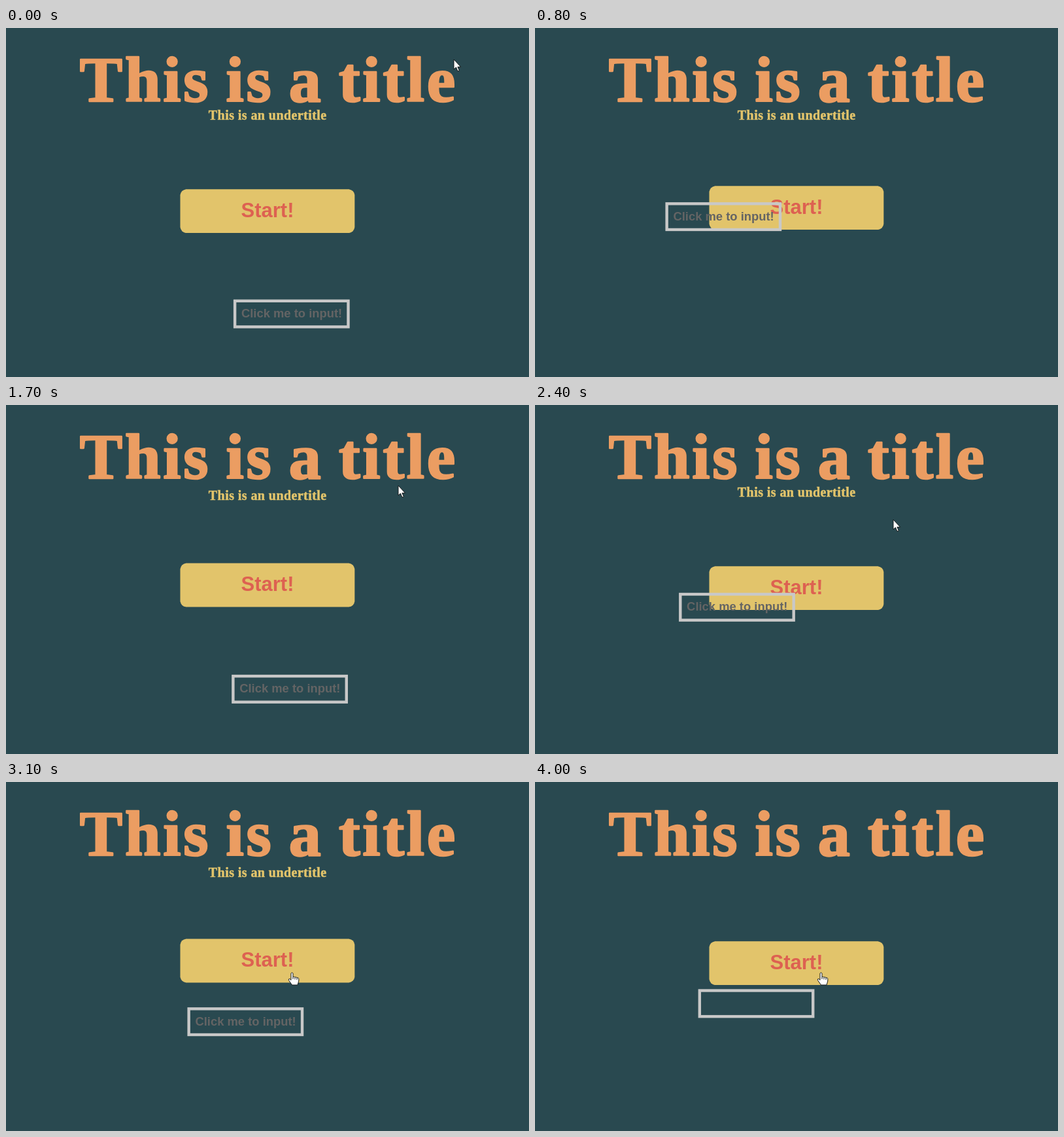
Write an HTML page that moves like this. It is 800 by 533 pixels and loops after 4.1 s.

```html
<!DOCTYPE html>
<html lang="en">
<head>
<meta charset="utf-8">
<style>
  html, body { margin: 0; height: 100%; overflow: hidden; background: #294950; }
  svg { display: block; width: 100vw; height: 100vh; }
  .serif { font-family: "Liberation Serif", serif; font-weight: bold; text-anchor: middle; stroke-linejoin: round; }
  .sans { font-family: "Liberation Sans", sans-serif; font-weight: bold; }
  #title { font-size: 98px; letter-spacing: 3.8px; word-spacing: -5px; fill: #eb9d62; stroke: #eb9d62; stroke-width: 2.6px; }
  #subtitle { font-size: 20px; letter-spacing: .43px; fill: #e2c46b; stroke: #e2c46b; stroke-width: .5px; }
  #cursor path { fill: #fff; stroke: #15191a; stroke-width: 1; stroke-linejoin: round; }
</style>
</head>
<body>
<svg viewBox="0 0 800 533">
  <rect width="800" height="533" fill="#294950"/>
  <text id="title" class="serif" x="402" y="111.5">This is a title</text>
  <text id="subtitle" class="serif" x="400.2" y="140">This is an undertitle</text>
  <g id="button">
    <path d="M8 0H258.5L266.5 8V58.5L258.5 66.5H8L0 58.5V8Z" fill="#e2c46b" stroke="#e2c46b" stroke-width="0"/>
    <rect width="266.5" height="66.5" rx="9" fill="#e2c46b"/>
    <text class="sans" x="133.3" y="42.7" font-size="31" text-anchor="middle" fill="#dd6151">Start!</text>
  </g>
  <g id="field">
    <rect x="2.2" y="2.2" width="173.4" height="39.6" fill="none" stroke="#c8c8c8" stroke-width="4.4"/>
    <text id="prompt" class="sans" x="12" y="27.5" font-size="18.4" fill="#646464">Click me to input!</text>
  </g>
  <g id="cursor">
    <path id="arrow" d="M0 0V15L3.5 12L6 18L8.4 17L5.9 11.4H10.6Z"/>
    <g id="hand">
      <path d="M-2 1.2Q-.5-1 1 1.2V7Q2.8 5.6 4 7.3Q5.8 6.2 7 8Q9.3 7.2 9.8 9.5V13L8 19H-.5L-5.6 11.5Q-6 9.4-4 9.6L-2 11.5Z"/>
      <path d="M1 7V10M4 7.5V10.5M7 8.2V11"/>
    </g>
  </g>
</svg>
<script>
const LOOP = 4100, STEP = 100, RAD = Math.PI / 180;
const $ = id => document.getElementById(id);

// Time in ms against swing angle in degrees; the clock skips ahead four times.
const clock = [
  [0, 114], [600, 196], [800, 229], [1100, 272], [1200, 342], [1300, 356],
  [1700, 422], [1800, 435], [1900, 499], [2400, 571.5], [2800, 631],
  [2900, 700], [3100, 727], [3200, 741], [3300, 806], [3600, 850], [4000, 911]
];
// Time in ms against pointer position.
const pointer = [
  [0, 685, 48], [600, 667, 71], [1400, 640, 90], [1700, 600, 123],
  [2400, 548, 175], [3000, 438, 291], [4000, 438, 291]
];

function sample(keys, t) {
  const i = Math.max(1, keys.findIndex(k => k[0] >= t));
  const a = keys[i - 1], b = keys[i];
  const p = (t - a[0]) / (b[0] - a[0]);
  return a.slice(1).map((v, n) => v + (b[n + 1] - v) * p);
}

const move = (id, x, y) => $(id).setAttribute("transform", `translate(${x} ${y})`);
const show = (id, on) => $(id).setAttribute("visibility", on ? "visible" : "hidden");

function draw(t) {
  const [angle] = sample(clock, t);
  const turn = angle - 114;
  const swing = 89 * Math.sin(angle * RAD);
  move("field", 266.6 + swing, 333.3 + swing);
  move("button", 266.7, 242.6 + 4 * Math.cos((15.5 + turn * .787) * RAD));
  move("subtitle", 0, turn % 330 > 265 ? 5 : 0);

  const last = t >= 4000;
  show("subtitle", !last);
  show("prompt", !last);

  const [x, y] = sample(pointer, t);
  const visible = t <= 600 || t >= 1400, over = y > 246;
  move("cursor", x, y);
  show("arrow", visible && !over);
  show("hand", visible && over);
}

function tick() {
  const t = performance.now() % LOOP;
  draw(Math.floor(t / STEP) * STEP);
  requestAnimationFrame(tick);
}
tick();
</script>
</body>
</html>
```
